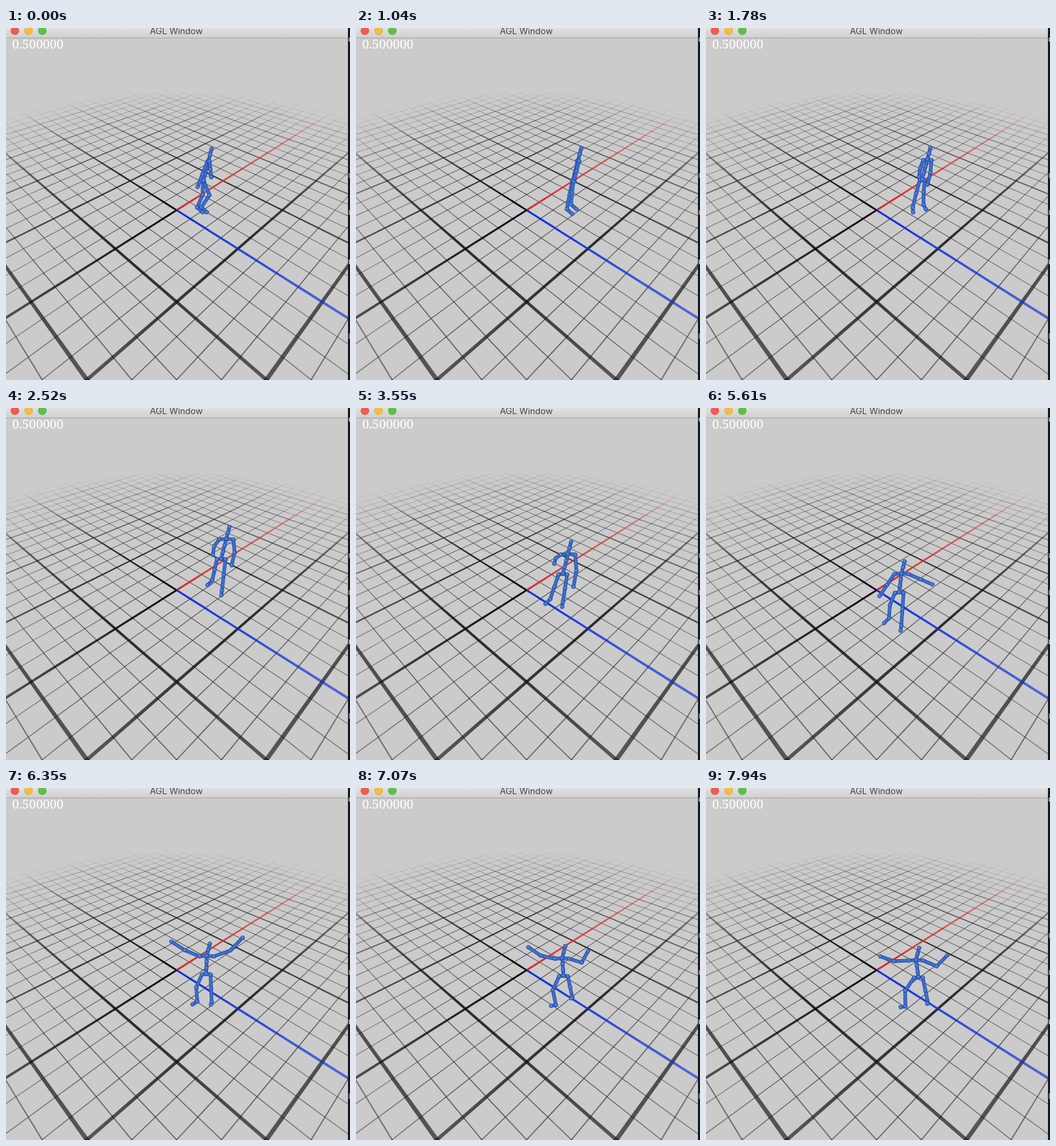
Write an HTML page with a canvas that moves like this. It is 502 px wide and 514 px high and loops after 8 s.

```html
<!DOCTYPE html>
<html lang="en">
<head>
<meta charset="utf-8">
<title>AGL Window</title>
<style>
html, body { margin: 0; width: 100%; height: 100%; overflow: hidden; background: #cbcbcb; }
canvas, svg { position: absolute; left: 0; top: 0; width: 502px; height: 514px; }
</style>
</head>
<body>
<canvas id="floor" width="502" height="514"></canvas>
<svg viewBox="0 0 502 514">
  <defs>
    <linearGradient id="bar" x2="0" y2="1">
      <stop stop-color="#e0e0e0"/><stop offset="1" stop-color="#d0d0d0"/>
    </linearGradient>
  </defs>
  <g id="body" stroke-linecap="round"></g>
  <rect width="499" height="14" fill="url(#bar)"/>
  <rect y="14" width="499" height="1" fill="#aaa"/>
  <g stroke-width=".7">
    <circle cx="13" cy="4" r="5.8" fill="#f25b50" stroke="#d9473e"/>
    <circle cx="33" cy="4" r="5.8" fill="#f6bd42" stroke="#dca034"/>
    <circle cx="53" cy="4" r="5.8" fill="#5cc145" stroke="#46a635"/>
  </g>
  <text x="248.5" y="9" text-anchor="middle" font-family="Inter, sans-serif" font-size="12.7" fill="#444">AGL Window</text>
  <text x="9" y="30" font-family="'Noto Serif', serif" font-size="18" fill="#fff">0.500000</text>
  <rect x="499" width="3" height="514" fill="#17191e"/>
  <rect x="500" y="14" width="2" height="6" fill="#8a8d92"/>
  <rect x="500" y="212" width="2" height="7" fill="#4f8467"/>
  <rect x="500" y="266" width="2" height="7" fill="#a3754c"/>
  <rect x="500" y="338" width="2" height="7" fill="#9a9da2"/>
  <rect x="500" y="446" width="2" height="8" fill="#55718f"/>
</svg>
<script>
const LOOP = 8000, STEP = 147;

// ---- floor grid in perspective, one unit per heavy line ----
const ctx = document.getElementById('floor').getContext('2d');
const RADIUS = 4.95, CELLS = 4;
const depth = (x, z) => 1 - 0.137 * (z - x);
const project = (x, z) => {
  const w = depth(x, z);
  return [249 + 77.1 * (x + z) / w, 355 / w - 89];
};

function gridLine(alongX, c, from, to, width, minWidth, rgb, strength = 1) {
  const place = (offset, t) => alongX ? [t, c + offset] : [c + offset, t];
  const half = Math.sqrt(Math.max(0, RADIUS * RADIUS - c * c));
  const a = Math.max(from, -half), b = Math.min(to, half);
  if (b <= a) return;
  const samples = [];
  for (let i = 0; i <= 40; i++) {
    const t = a + (b - a) * i / 40, at = place(0, t);
    if (depth(...at) > 0.45) samples.push({ p: project(...at), q: project(...place(0.01, t)), r: Math.hypot(c, t) });
  }
  if (samples.length < 2) return;
  const start = samples[0].p, end = samples[samples.length - 1].p;
  const dx = end[0] - start[0], dy = end[1] - start[1], len = Math.hypot(dx, dy);
  const nx = -dy / len, ny = dx / len;
  const paint = ctx.createLinearGradient(...start, ...end), left = [], right = [];
  for (const { p, q, r } of samples) {
    const scale = Math.abs((q[0] - p[0]) * nx + (q[1] - p[1]) * ny) * 100;
    const h = Math.max(minWidth, width * scale) / 2;
    left.push([p[0] + nx * h, p[1] + ny * h]);
    right.unshift([p[0] - nx * h, p[1] - ny * h]);
    const alpha = strength * Math.max(0, 1 - (r / RADIUS) ** 1.25);
    const along = Math.hypot(p[0] - start[0], p[1] - start[1]) / len;
    paint.addColorStop(Math.min(1, along), `rgba(${rgb},${alpha})`);
  }
  ctx.fillStyle = paint;
  ctx.beginPath();
  left.concat(right).forEach(p => ctx.lineTo(...p));
  ctx.fill();
}

function drawFloor() {
  ctx.fillStyle = '#cbcbcb';
  ctx.fillRect(0, 0, 502, 514);
  const each = draw => {
    for (let i = -5 * CELLS; i <= 5 * CELLS; i++) for (const alongX of [true, false]) draw(i, alongX);
  };
  each((i, alongX) => { if (i % CELLS) gridLine(alongX, i / CELLS, -9, 9, 0.0085, 0.85, '40,40,40', 0.95); });
  each((i, alongX) => { if (i && i % CELLS === 0) gridLine(alongX, i / CELLS, -9, 9, 0.031, 1.2, '18,18,18'); });
  for (const alongX of [true, false]) gridLine(alongX, 0, -9, 0, 0.031, 1.2, '5,5,5');
  gridLine(true, 0, 0, 9, 0.033, 1.2, '218,38,38');
  gridLine(false, 0, 0, 9, 0.033, 1.2, '14,46,216');
}

// ---- figure: walks sideways, turns to the viewer, then balances with raised arms ----
const add = (p, x, y) => [p[0] + x, p[1] + y];
const mix = (p, q, k) => p.map((v, i) => v + (q[i] - v) * k);
const ramp = (t, from, to) => Math.min(1, Math.max(0, (t - from) / (to - from)));

function path(t, keys) {
  let i = 0;
  while (i < keys.length - 2 && t >= keys[i + 1].t) i++;
  const a = keys[i], b = keys[i + 1];
  return mix(a.p, b.p, ramp(t, a.t, b.t));
}
const root = [
  { t: 0, p: [288, 223] }, { t: 1040, p: [317, 222] }, { t: 2520, p: [314, 220] }, { t: 4430, p: [291, 262] },
  { t: 5010, p: [282, 269] }, { t: 5610, p: [282, 269] }, { t: 7070, p: [303, 274] }, { t: 7940, p: [310, 276] }
];
// hands from the neck and ankles from the pelvis: standing, arms up, leaning
const balancing = (t, ...points) => path(t, points.map((p, i) => ({ t: [5610, 7070, 7940][i], p })));
const balanceHand = (t, side) => side < 0
  ? balancing(t, [-32, 33], [-49, -15], [-52, -5])
  : balancing(t, [45, 16], [37, -9], [45, -6]);
const balanceAnkle = (t, side) => side < 0
  ? balancing(t, [-15, 38], [-11, 43], [-19, 43])
  : balancing(t, [3, 49], [13, 32], [14, 38]);

// middle joint, pushed square to the line from p to q
function joint(p, q, bend) {
  const dx = q[0] - p[0], dy = q[1] - p[1], len = Math.hypot(dx, dy) || 1;
  return add(mix(p, q, 0.5), bend * dy / len, -bend * dx / len);
}

function poseAt(t) {
  const facing = ramp(t, 1040, 2520), balance = ramp(t, 4430, 5010);
  const raise = ramp(t, 5610, 7070), lean = ramp(t, 4430, 7500);
  const phase = 2 * Math.PI * t / 1387, swing = Math.cos(phase), step = Math.sin(phase);
  const fling = Math.sin(Math.PI * raise ** 1.3);

  const pelvis = path(t, root);
  const neck = add(pelvis, 7.5 - 11 * lean, -29 + 4 * lean);
  const head = add(neck, 4.5, -17.5);
  const span = 1.5 + 9 * facing;

  const arm = side => {
    const shoulder = add(neck, side * span, 1);
    const hanging = [-6 + side * (14 * facing + 10 * swing * (1 - facing)), 31 + side * (10 * facing - 7 * swing)];
    const reach = add(mix(hanging, balanceHand(t, side), balance), side * 12 * fling, -32 * fling);
    const hand = add(neck, ...reach);
    const bend = side * (3 * facing * (1 - balance) - (side < 0 ? 4 : 12) * raise);
    return [neck, shoulder, joint(shoulder, hand, bend), hand];
  };
  const leg = side => {
    const hip = add(pelvis, side * span * 0.6, 1);
    const walking = [
      -6 - 6 * ramp(t, 2520, 4430) + side * (3 + 7 * facing + 3 * step * facing),
      39 + side * step * (3.5 - 11.5 * facing)
    ];
    const ankle = add(pelvis, ...mix(walking, balanceAnkle(t, side), balance));
    const bend = (7 + 3 * side) * swing * (1 - facing) - (side < 0 ? 3 * balance + 4 * raise : 0);
    const toe = add(ankle, 8 - 12 * facing + 3 * side * facing, 7 - 6 * raise);
    return [pelvis, hip, joint(hip, ankle, bend), ankle, toe];
  };
  const trunk = [0, 0.33, 0.67, 1].map(k => mix(pelvis, neck, k)).concat([mix(neck, head, 0.5), head]);
  return [leg(-1), leg(1), trunk, arm(-1), arm(1)];
}

const body = document.getElementById('body');
const stroke = (p, q, width, color) =>
  `<path d="M${p.map(v => v.toFixed(2))}L${q.map(v => v.toFixed(2))}" stroke="${color}" stroke-width="${width}"/>`;
const ball = ([x, y]) =>
  `<circle cx="${x.toFixed(2)}" cy="${y.toFixed(2)}" r="2.8" fill="#3f76dc" stroke="#27478f" stroke-width=".7"/>` +
  `<circle cx="${(x - 0.5).toFixed(2)}" cy="${(y - 0.8).toFixed(2)}" r="1.1" fill="#5b90f0"/>`;

function drawBody(t) {
  body.innerHTML = poseAt(t).map(chain => {
    const bones = chain.slice(1).map((q, i) =>
      stroke(chain[i], q, 5.2, '#27478f') + stroke(chain[i], q, 3.6, '#3b6ed2'));
    return bones.join('') + chain.map(ball).join('');
  }).join('');
}

let shown = -1;
function render(now) {
  const step = Math.floor(now % LOOP / STEP);
  if (step !== shown) drawBody(step * STEP);
  shown = step;
  requestAnimationFrame(render);
}

drawFloor();
drawBody(0);
requestAnimationFrame(render);
</script>
</body>
</html>
```
